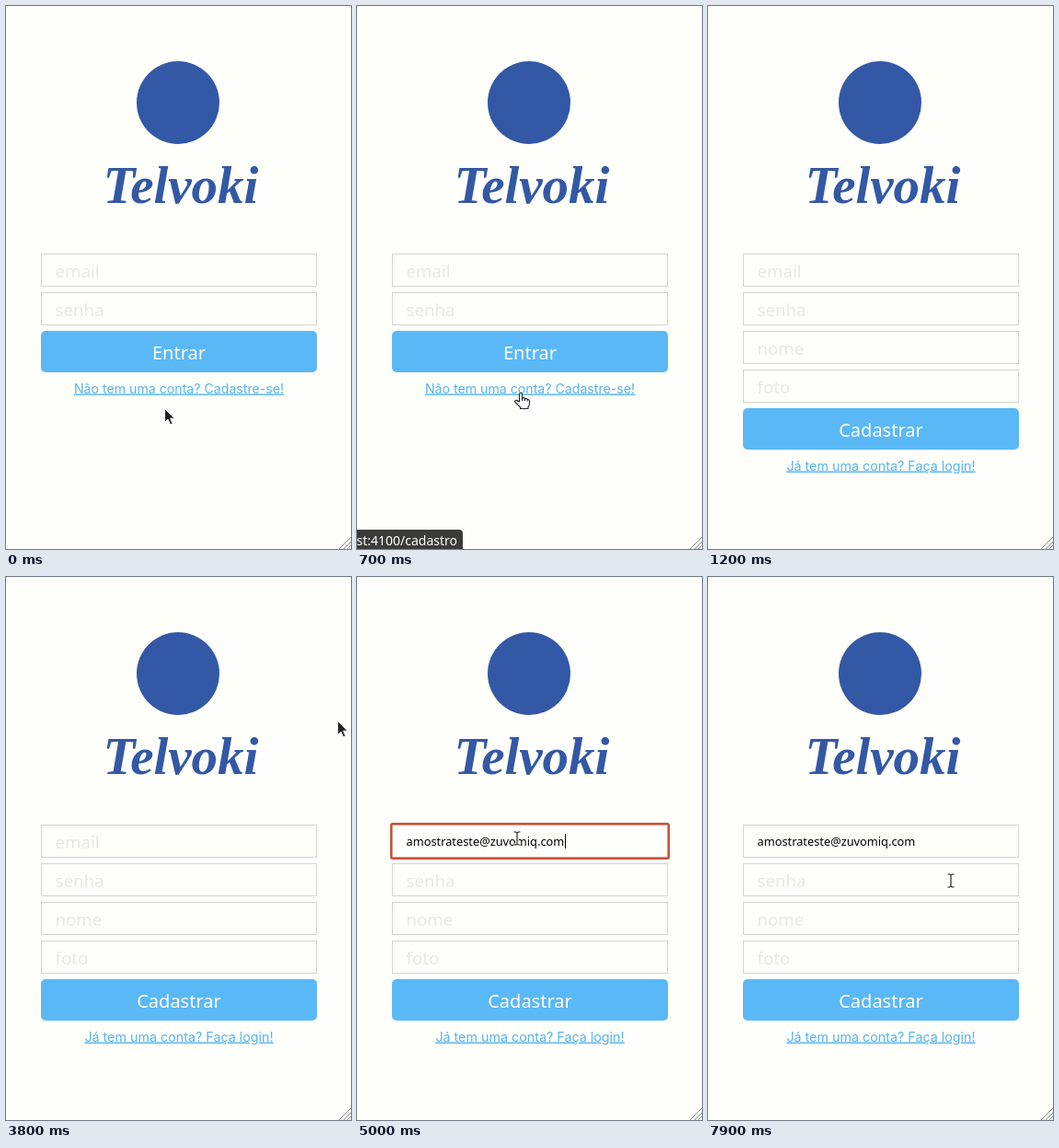
Write an HTML page that moves like this. It is 375 by 590 pixels and loops after 8000 ms.

```html
<!DOCTYPE html>
<html lang="pt-BR">
<head>
<meta charset="utf-8">
<title>Cadastro</title>
<style>
html, body { margin: 0; width: 100%; height: 100%; overflow: hidden; background: #fefffb; }
svg { display: block; width: 375px; height: 590px; font-family: "Noto Sans", "Open Sans", sans-serif; }

.mark, .brand { fill: #3358a5; }
.brand { font: italic bold 57px "Liberation Serif", serif; text-anchor: middle; }
.box { fill: #fefffb; stroke: #d3d4d0; }
.hint { fill: #e6e9e2; font-size: 18.7px; }
.button { fill: #5ab8f7; }
.label { fill: #fff; font-size: 20px; text-anchor: middle; }
.link { fill: #55b4f0; font-family: Inter, "Open Sans", sans-serif; text-anchor: middle;
  text-decoration: underline; }
.value { fill: #000; font-size: 12.8px; }
.ring { fill: none; stroke: #c9513a; stroke-width: 2.4; }
.grip { fill: none; stroke: #8b8b89; }
.status rect { fill: #3b3b3a; }
.status text { fill: #fff; font-size: 14px; text-anchor: end; }

/* 1.25% of the loop is 100 ms; every change is a hard cut */
.login, .signup, .before, .value, .ring, .caret, .status, .arrow, .hand, .beam {
  animation: 8s step-end infinite;
}
.login { animation-name: login; }
.signup { animation-name: signup; }
.before { animation-name: before; }
.value { animation-name: value; }
.ring { animation-name: ring; }
.caret { animation-name: caret; }
.status { animation-name: status; }
.arrow { animation-name: arrow; }
.hand { animation-name: hand; }
.beam { animation-name: beam; }

@keyframes login { 0% { opacity: 1 } 11.25%, 100% { opacity: 0 } }
@keyframes signup { 0% { opacity: 0 } 11.25%, 100% { opacity: 1 } }
@keyframes before { 0% { opacity: 1 } 62.5%, 100% { opacity: 0 } }
@keyframes value { 0% { opacity: 0 } 62.5%, 100% { opacity: 1 } }
@keyframes ring { 0% { opacity: 0 } 58.75% { opacity: 1 } 76.25%, 100% { opacity: 0 } }
@keyframes caret {
  0% { opacity: 0; transform: translate(54px, 279px) }
  58.75% { opacity: 1; transform: translate(54px, 279px) }
  62.5% { opacity: 1; transform: translate(226px, 279px) }
  72.5%, 100% { opacity: 0; transform: translate(226px, 279px) }
}
@keyframes status {
  0% { opacity: 0 }
  6.25% { opacity: .35 }
  7.5% { opacity: .7 }
  8.75% { opacity: 1 }
  12.5% { opacity: .66 }
  13.75% { opacity: .33 }
  15%, 100% { opacity: 0 }
}
@keyframes arrow {
  0% { opacity: 1; transform: translate(172px, 437px) }
  1.25% { opacity: 0; transform: translate(172px, 437px) }
  3.75% { opacity: 1; transform: translate(173px, 433px) }
  5% { opacity: 0; transform: translate(173px, 433px) }
  47.5% { opacity: 1; transform: translate(360px, 156px) }
  48.75% { opacity: 1; transform: translate(318px, 196px) }
  50% { opacity: 1; transform: translate(250px, 248px) }
  51.25%, 100% { opacity: 0; transform: translate(250px, 248px) }
}
@keyframes hand {
  0% { opacity: 0; transform: translate(176px, 424px) }
  5% { opacity: 1; transform: translate(176px, 424px) }
  6.25% { opacity: 1; transform: translate(178px, 421px) }
  12.5%, 100% { opacity: 0; transform: translate(178px, 421px) }
}
@keyframes beam {
  0% { opacity: 0; transform: translate(178px, 421px) }
  12.5% { opacity: 1; transform: translate(178px, 421px) }
  15% { opacity: 0; transform: translate(178px, 421px) }
  51.25% { opacity: 1; transform: translate(186px, 302px) }
  52.5% { opacity: 1; transform: translate(174px, 296px) }
  62.5% { opacity: 1; transform: translate(174px, 284px) }
  63.75% { opacity: 1; transform: translate(175px, 286px) }
  65% { opacity: 1; transform: translate(176px, 289px) }
  66.25% { opacity: 0; transform: translate(176px, 289px) }
  97.5% { opacity: 1; transform: translate(278px, 303px) }
  98.75%, 100% { opacity: 1; transform: translate(264px, 330px) }
}
</style>
</head>
<body>
<svg viewBox="0 0 375 590">
  <defs>
    <rect id="box" class="box" x="38.5" y=".5" width="299" height="35"/>
    <rect id="button" class="button" x="38" width="300" height="45" rx="5"/>
    <path id="ibeam" d="M-3.5 -7 H-1.5 L0 -6 L1.5 -7 H3.5 M0 -6 V6 M-3.5 7 H-1.5 L0 6 L1.5 7 H3.5" fill="none"/>
  </defs>

  <circle class="mark" cx="187" cy="105" r="45"/>
  <text class="brand" x="190" y="214">Telvoki</text>

  <use href="#box" y="269"/>
  <use href="#box" y="311"/>
  <text class="hint before" x="53.5" y="295">email</text>
  <text class="hint" x="53.5" y="337">senha</text>

  <g class="login">
    <use href="#button" y="353"/>
    <text class="label" x="188" y="384">Entrar</text>
    <text class="link" x="188" y="420.5" font-size="14.15">Não tem uma conta? Cadastre-se!</text>
  </g>

  <g class="signup">
    <use href="#box" y="353"/>
    <use href="#box" y="395"/>
    <text class="hint" x="53.5" y="379">nome</text>
    <text class="hint" x="53.5" y="421">foto</text>
    <use href="#button" y="437"/>
    <text class="label" x="188" y="468">Cadastrar</text>
    <text class="link" x="188" y="504.5" font-size="14.3">Já tem uma conta? Faça login!</text>
  </g>

  <text class="value" x="53.5" y="291.5">amostrateste@zuvomiq.com</text>
  <rect class="ring" x="37.2" y="268.2" width="301.6" height="37.6" rx="1.5"/>
  <rect class="caret" width="1" height="16"/>

  <path class="grip" d="M362 590 L375 577 M367 590 L375 582 M371 590 L375 586"/>

  <g class="status">
    <rect x="-10" y="569" width="125" height="30" rx="4"/>
    <text x="109" y="585.5">st:4100/cadastro</text>
  </g>

  <path class="arrow" d="M.5 .5 V15.5 L4 12.2 L6.6 18 L9.2 16.8 L6.7 11.2 H11.5 Z"
    fill="#222" stroke="#fff" stroke-linejoin="round"/>
  <path class="hand" d="M-1.5 9 V1 Q-1.5 -.5 0 -.5 Q1.5 -.5 1.5 1 V5 Q3.5 4 4.5 5.7 Q6.5 5 7.3 6.6 Q9.5 6.2 9.5 8.5 V11 Q9.5 13 8 14.5 V16.5 H-.5 V15 L-6 9.7 Q-7 8 -5.3 7.4 Q-4 7.2 -1.5 9 Z M1.5 5 V8 M4.5 5.7 V8 M7.3 6.6 V8.5"
    fill="#fff" stroke="#222" stroke-width="1.1" stroke-linejoin="round"/>
  <g class="beam">
    <use href="#ibeam" stroke="#fff" stroke-width="3"/>
    <use href="#ibeam" stroke="#222" stroke-width="1.2"/>
  </g>
</svg>
</body>
</html>
```
